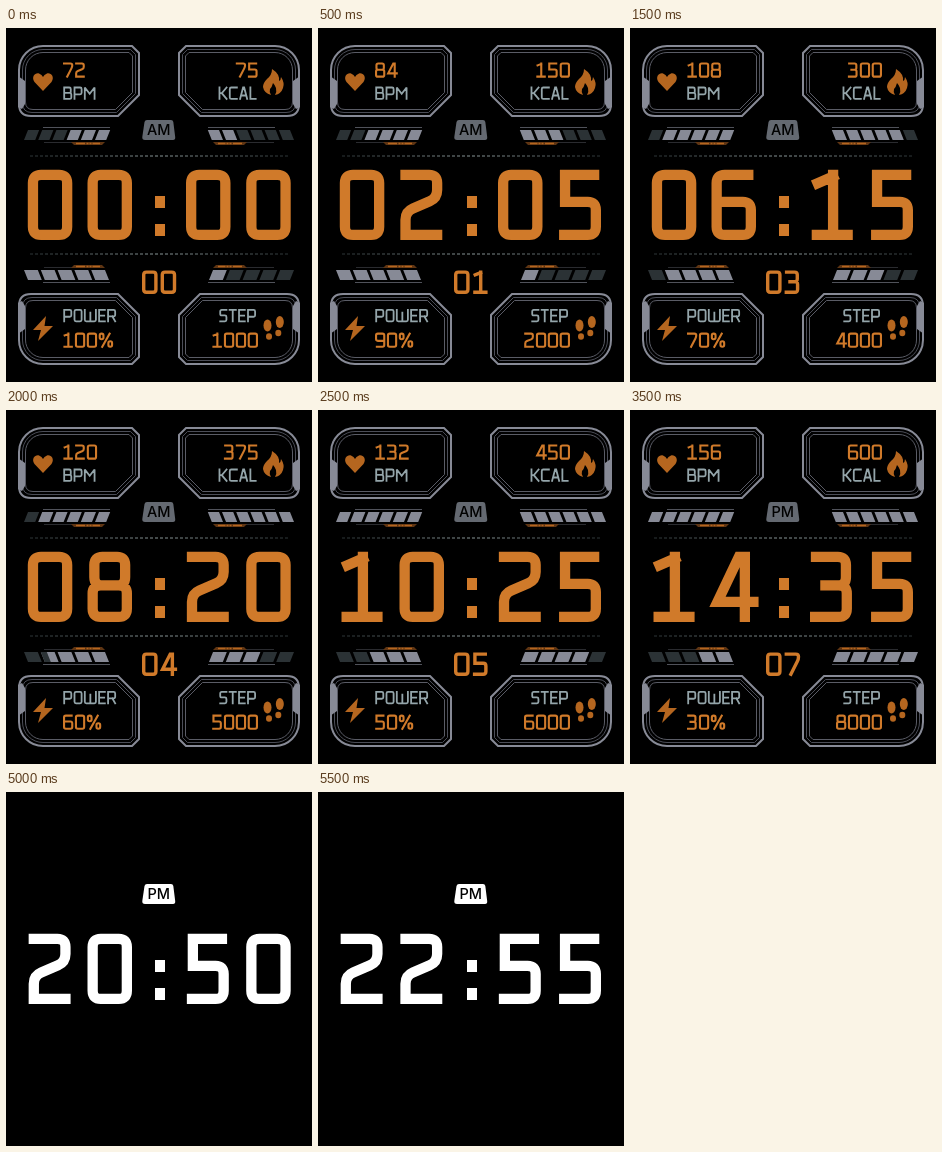
An HTML page that plays this animation: 306x354 px, repeating every 6 s.

```html
<!DOCTYPE html>
<html lang="en">
<head>
<meta charset="utf-8">
<title>Watch face</title>
<style>
  html, body { margin: 0; width: 100%; height: 100%; overflow: hidden; background: #000; }
  svg { display: block; width: 100%; height: 100%; }
  .glyphs { fill: none; stroke-linecap: square; stroke-miterlimit: 3; }
  .badge { font: 500 14.5px Inter, Roboto, sans-serif; text-anchor: middle; fill: #000; }
</style>
</head>
<body>
<svg id="face" viewBox="0 0 306 354" role="img" aria-label="Digital watch face">
  <defs>
    <linearGradient id="fade" gradientUnits="userSpaceOnUse" x1="23" y1="0" x2="284" y2="0">
      <stop offset="0" stop-color="#2b3335"/>
      <stop offset=".5" stop-color="#8b9899"/>
      <stop offset="1" stop-color="#2b3335"/>
    </linearGradient>
    <g id="panel" fill="none">
      <path d="M13 42A24 24 0 0 1 37 18H126L133 25V67L112 88H25Q13 88 13 76Z" stroke="#878a96" stroke-width="2"/>
      <path d="M16.500 42A20.500 20.500 0 0 1 37 21.500H124.500L129.500 26.500V65.500L110.500 84.500H26Q16.500 84.500 16.500 75Z" stroke="#4b4d57"/>
      <path d="M19.500 42A17.500 17.500 0 0 1 37 24.500H123L126.500 28V64.500L109.500 81.500H27Q19.500 81.500 19.500 74Z" stroke="#5a5c66"/>
      <path d="M12 48L19 53V76L16 81L12 79Z" fill="#878a96"/>
    </g>
    <g id="trim">
      <path d="M37 99.500H104" stroke="#50525a"/>
      <path d="M38 114.500H66" stroke="#2a2b2f"/>
      <path d="M65 114H99L96 117H68Z" fill="#5f3513"/>
      <path d="M70 115.500H94" stroke="#b5661f" stroke-width="1.500" stroke-dasharray="9 1.500 2 1 2 1"/>
    </g>
  </defs>
  <rect width="306" height="354"/>
  <g id="full">
    <g id="corners"></g>
    <g stroke="url(#fade)" stroke-dasharray="3 2">
      <path d="M24 128H283"/><path d="M24 226H283"/>
    </g>
    <g fill="#b5661f">
      <path d="M37 63L28.500 54C25 49 29 44.500 33 45.500Q36 46.500 37 49Q38 46.500 41 45.500C45 44.500 49 49 45.500 54Z"/>
      <path d="M266 41Q274 46 273 53Q275 52 275 49Q279 55 277 60Q275 66 269 67Q271 64 270 60Q269 57 267 55Q266 59 264 61Q263 64 265 67Q258 65 257 59Q257 55 261 51Q266 47 266 41Z"/>
      <path d="M40 288L27 302H35L32 313L47 298H38.500Z"/>
      <ellipse cx="261.500" cy="297.500" rx="4" ry="6"/>
      <ellipse cx="263" cy="308.500" rx="3" ry="3.200"/>
      <ellipse cx="273.800" cy="294" rx="4" ry="6"/>
      <ellipse cx="272.300" cy="305" rx="3" ry="3.200"/>
    </g>
    <g id="labels"></g>
    <g id="values"></g>
  </g>
  <path id="plate" d="M141 92H165Q167 92 167.300 94L169.200 109Q169.500 112 167 112H139Q136 112 136.300 109L138.500 94Q139 92 141 92Z"/>
  <text id="half" class="badge" x="152.800" y="107"></text>
  <g id="clock"></g>
</svg>
<script>
const $ = id => document.getElementById(id);
const ORANGE = '#d07a2a', LABEL = '#94a5aa', LIT = '#878a96', DIM = '#2b3235';

// Strokes on a 4 x 8 grid; "!" keeps a corner sharp, "z" closes the loop.
const GLYPHS = {
  0: '0,0 4,0 4,8 0,8 z',
  1: '0.3,1.1 2.1,0.2|2.1,0 2.1,8|0.2,8 3.8,8',
  2: '0.1,0 3.8,0 3.8,3.1 0.1,4.9 0.1,8! 3.8,8',
  3: '0.1,0 3.6,0 3.6,3.8 1.2,3.8|1.2,3.8 3.7,3.8 3.7,8 0,8',
  4: '3.3,8 3.3,0! 2.6,0! 0.1,6! 4.3,6',
  5: '3.6,0 0.2,0! 0.2,3.6! 3.8,3.6 3.8,8 0.1,8',
  6: '3.7,0 0,0 0,8 4,8 4,3.6 0,3.6',
  7: '0,0 4,0 4,2 1.5,8',
  8: '0.2,0 3.8,0 3.8,3.8 0.2,3.8 z|0,3.8 4,3.8 4,8 0,8 z',
  9: '4,4.4 0,4.4 0,0 4,0 4,8 0.4,8',
  '%': '0,0 1.2,0 1.2,3.4 0,3.4 z|2.8,4.6 4,4.6 4,8 2.8,8 z|3.2,0 0.8,8',
  A: '0,8 1.7,0! 2.3,0! 4,8|0.7,5.6 3.3,5.6',
  B: '0,0! 3.7,0 3.7,3.8 0,3.8|0,3.8 4,3.8 4,8 0,8! 0,0',
  C: '4,0 0,0 0,8 4,8',
  E: '4,0 0,0! 0,8! 4,8|0,4 3.5,4',
  K: '0,0 0,8|4,0 1.3,4! 4,8|0,4 1.3,4',
  L: '0,0 0,8! 4,8',
  M: '0,8 0,0! 2,4.4! 4,0! 4,8',
  O: '0,0 4,0 4,8 0,8 z',
  P: '0,8 0,0! 4,0 4,4.8 0,4.8',
  R: '0,8 0,0! 4,0 4,4.5 0,4.5|2.4,4.5 4,8',
  S: '4,0 0,0 0,3.9 4,3.9 4,8 0,8',
  T: '0,0 4,0|2,0 2,8',
  W: '0,0 0,8 4,8 4,0|2,2 2,8'
};
const WIDE = { M: 1.3, W: 1.45, E: .85, L: .8, S: .9, T: .9, '%': 1.4 };

function strokePath(line, x, y, w, h, r) {
  const tokens = line.split(' ');
  const closed = tokens[tokens.length - 1] === 'z';
  if (closed) tokens.pop();
  const pts = tokens.map(t => {
    const [a, b] = t.split(',').map(parseFloat);
    return { x: x + a * w / 4, y: y + b * h / 8, sharp: t.endsWith('!') };
  });
  const count = pts.length;
  const toward = (p, q) => {
    const len = Math.hypot(q.x - p.x, q.y - p.y);
    const k = Math.min(r, len / 2) / len;
    return `${(p.x + (q.x - p.x) * k).toFixed(2)} ${(p.y + (q.y - p.y) * k).toFixed(2)}`;
  };
  let d = '';
  pts.forEach((p, i) => {
    const cmd = d ? 'L' : 'M';
    const end = !closed && (i === 0 || i === count - 1);
    if (end || p.sharp) { d += `${cmd}${p.x} ${p.y}`; return; }
    const prev = pts[(i + count - 1) % count], next = pts[(i + 1) % count];
    d += `${cmd}${toward(p, prev)}Q${p.x} ${p.y} ${toward(p, next)}`;
  });
  return d + (closed ? 'Z' : '');
}

function glyph(ch, x, y, w, h, s) {
  return GLYPHS[ch].split('|')
    .map(l => strokePath(l, x + s / 2, y + s / 2, w - s, h - s, h * .115)).join('');
}

function lettering(str, x, y, style, right) {
  const { w, h, s, gap, color } = style;
  const widths = [...str].map(c => w * (WIDE[c] || 1));
  if (right) x -= widths.reduce((a, b) => a + b + gap, -gap);
  let d = '';
  [...str].forEach((c, i) => {
    d += glyph(c, x, y, widths[i], h, s);
    x += widths[i] + gap;
  });
  return `<path class="glyphs" aria-label="${str}" d="${d}" stroke="${color}" stroke-width="${s}"/>`;
}

const VALUE = { w: 10.3, h: 15.2, s: 2.1, gap: 1.6, color: ORANGE };
const NAME = { w: 8.9, h: 13.2, s: 1.8, gap: 1.4, color: LABEL };
const SECOND = { w: 15.6, h: 23.6, s: 3.4, gap: 3, color: ORANGE };

const MIRRORS = ['', 'translate(306 0) scale(-1 1)', 'translate(0 354) scale(1 -1)', 'translate(306 354) scale(-1 -1)'];
$('corners').innerHTML = MIRRORS.map((m, i) =>
  `<g transform="${m}"><use href="#panel"/><use href="#trim"/><g id="bar${i}"></g></g>`).join('');
$('labels').innerHTML =
  lettering('BPM', 57.3, 58.6, NAME) + lettering('KCAL', 250.6, 58.6, NAME, true) +
  lettering('POWER', 57.3, 281, NAME) + lettering('STEP', 250, 281, NAME, true);

const slant = (x, w, color) => `<path d="M${x} 112L${x + 4} 102H${x + 4 + w}L${x + w} 112Z" fill="${color}"/>`;

// Segments go dark from the outer end inwards; half a step darkens a 6px slice.
function bar(id, count, dark) {
  const pitch = count === 6 ? 14.2 : 16.8, w = pitch - 3;
  let out = '';
  for (let i = 0; i < count; i++) {
    const x = 18 + i * pitch, off = dark - i;
    out += slant(x, w, off >= 1 ? DIM : LIT);
    if (off > 0 && off < 1) out += slant(x, 6, DIM);
  }
  $(id).innerHTML = out;
}

const two = v => String(v).padStart(2, '0');

function show(n) {
  const idle = n >= 10, ink = idle ? '#fff' : ORANGE;
  const digits = two(n * 2) + two(n * 5);
  const d = [21.8, 81.5, 180, 240.2].map((x, i) => glyph(digits[i], x, 141.8, 44.5, 70.2, 10.3)).join('');
  $('clock').innerHTML =
    `<path class="glyphs" d="${d}" stroke="${ink}" stroke-width="10.3"/>` +
    `<path d="M149 168h10v12h-10zM149 196h10v12h-10z" fill="${ink}"/>`;
  $('plate').setAttribute('fill', idle ? '#fff' : '#646971');
  $('half').textContent = n < 6 ? 'AM' : 'PM';
  $('full').style.display = idle ? 'none' : '';
  if (idle) return;

  const steps = 1000 * (n + 1);
  $('values').innerHTML =
    lettering(String(72 + 12 * n), 57, 34.5, VALUE) +
    lettering(String(75 * (n + 1)), 252, 34.5, VALUE, true) +
    lettering(100 - 10 * n + '%', 57, 304.6, VALUE) +
    lettering(String(steps), 252, 304.6, VALUE, true) +
    lettering(two(n), 136, 242.4, SECOND);
  bar('bar0', 6, 3 - Math.floor((n + 1) / 2));
  bar('bar1', 6, 4 - n);
  bar('bar2', 5, (n - 1) / 2);
  bar('bar3', 5, 5 - Math.round(steps / 1600));
}

let shown = -1;
const start = performance.now();
function tick() {
  const n = Math.floor((performance.now() - start) / 500) % 12;
  if (n !== shown) show(shown = n);
  requestAnimationFrame(tick);
}
tick();
</script>
</body>
</html>
```
